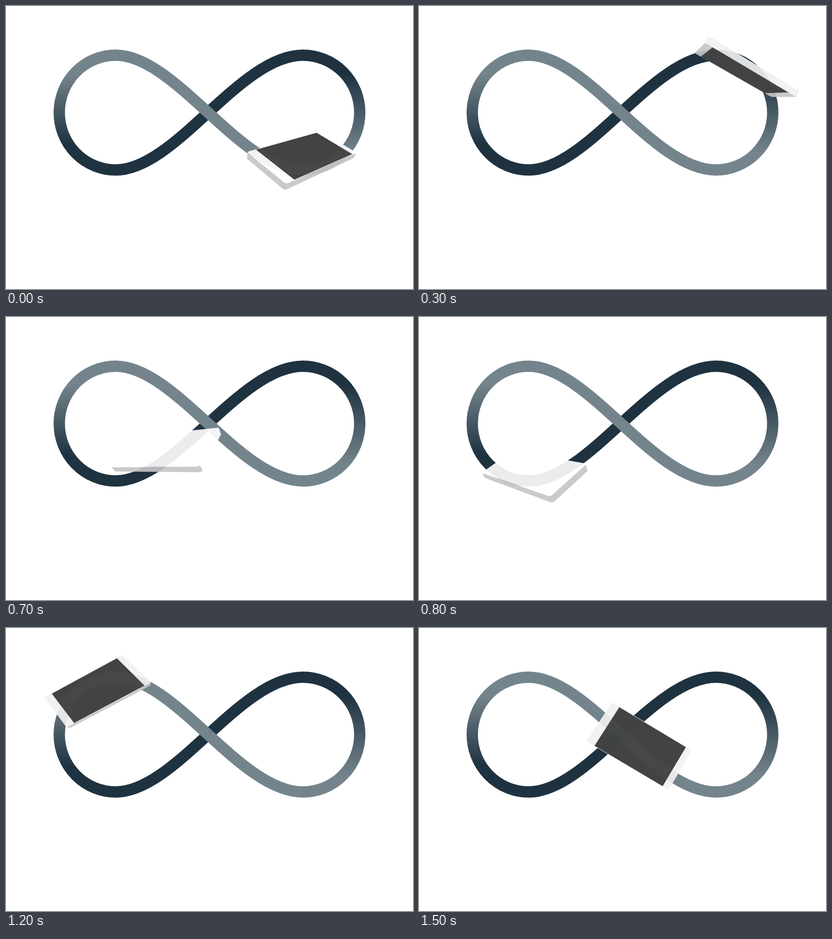
An HTML page with a canvas that plays this animation: 898x624 px, repeating every 1600 ms.

```html
<!DOCTYPE html>
<html lang="en">
<head>
<meta charset="utf-8">
<title>Phone on an infinity loop</title>
<style>
html, body { margin: 0; width: 100%; height: 100%; overflow: hidden; background: #fff; }
canvas { display: block; }
</style>
</head>
<body>
<canvas width="898" height="624"></canvas>
<script>
const g = document.querySelector('canvas').getContext('2d');
const LOOP = 1600, STEP = 100, CAMERA = 520, THICKNESS = 15;
const GREY = '#74848d', DARK = '#1f3240';

// Time, then the four front corners of the phone as seen on the stage.
const poses = [
  [0, 533,322, 694,277, 772,323, 618,391],
  [300, 777,200, 609,104, 632,82, 831,200],
  [500, 655,100, 471,124, 487,195, 699,158],
  [800, 372,338, 212,306, 145,354, 295,409],
  [1000, 177,324, 127,143, 77,141, 133,346],
  [1100, 62,230, 141,67, 187,96, 96,285],
  [1200, 86,153, 257,60, 319,120, 134,218],
  [1500, 426,165, 601,270, 550,356, 371,250]
].map(solvePose);

const cross = (a, b) => [a[1] * b[2] - a[2] * b[1], a[2] * b[0] - a[0] * b[2], a[0] * b[1] - a[1] * b[0]];
const scaleTo = (v, length) => v.map(c => c * length / Math.hypot(...v));
const minus = (a, b) => a.map((c, i) => c - b[i]);

// Recover centre and 3D edge vectors from where the diagonals cross.
function solvePose([time, ax, ay, bx, by, cx, cy, dx, dy]) {
  const px = cx - ax, py = cy - ay, qx = dx - bx, qy = dy - by;
  const s = ((bx - ax) * qy - (by - ay) * qx) / (px * qy - py * qx);
  const r = ((bx - ax) * py - (by - ay) * px) / (px * qy - py * qx);
  const half = (x, y, k) => [2 * k * (1 - k) * x, 2 * k * (1 - k) * y, (1 - 2 * k) * CAMERA];
  const c = half(px, py, s), d = half(qx, qy, r);
  return { time, state: [ax + s * px, ay + s * py, ...c.map((v, i) => v - d[i]), ...c.map((v, i) => v + d[i])] };
}

function key(i) {
  const n = poses.length, turn = Math.floor(i / n), pose = poses[i - turn * n];
  return { time: pose.time + turn * LOOP, state: pose.state };
}

function poseAt(time) {
  let i = poses.length - 1;
  while (poses[i].time > time) i--;
  const [k0, k1, k2, k3] = [i - 1, i, i + 1, i + 2].map(key);
  const h0 = k1.time - k0.time, h = k2.time - k1.time, h2 = k3.time - k2.time;
  const t = (time - k1.time) / h;
  const state = k1.state.map((a, j) => {
    const b = k2.state[j], slope = (b - a) / h;
    const m1 = (h * (a - k0.state[j]) / h0 + h0 * slope) / (h0 + h);
    const m2 = (h2 * slope + h * (k3.state[j] - b) / h2) / (h + h2);
    return a + (b - a) * t * t * (3 - 2 * t) + h * t * (1 - t) * (m1 * (1 - t) - m2 * t);
  });
  const edge = from => {
    const size = k => Math.hypot(...k.state.slice(from, from + 3));
    return scaleTo(state.slice(from, from + 3), size(k1) + (size(k2) - size(k1)) * t);
  };
  return { x: state[0], y: state[1], u: edge(2), v: edge(5) };
}

function verticalFade(top, bottom, y1, y2) {
  const fade = g.createLinearGradient(0, y1, 0, y2);
  fade.addColorStop(0, top);
  fade.addColorStop(1, bottom);
  return fade;
}

const track = [
  ['M242 361.5C374 361.5 516 108.5 655 108.5', DARK],
  ['M241 361.5H242A124.5 126.5 0 0 1 242 108.5H243', verticalFade(GREY, DARK, 150, 305)],
  ['M654 108.5H655A125.5 126.5 0 0 1 655 361.5H654', verticalFade(DARK, GREY, 150, 325)],
  ['M242 108.5C374 108.5 516 361.5 655 361.5', GREY]
].map(([d, colour]) => [new Path2D(d), colour]);

function drawTrack() {
  g.lineWidth = 25;
  for (const [path, colour] of track) {
    g.strokeStyle = colour;
    g.stroke(path);
  }
}

// Rounded outline of the phone in units of its two edges.
const outline = [];
[[-1, -1], [1, -1], [1, 1], [-1, 1]].forEach(([a, b], corner) => {
  for (let i = 0; i <= 4; i++) {
    const angle = (corner + 2 + i / 4) * Math.PI / 2;
    outline.push([a * 0.485 + 0.02 * Math.cos(angle), b * 0.47 + 0.04 * Math.sin(angle)]);
  }
});
const screen = [[-0.41, -0.5], [0.43, -0.5], [0.43, 0.5], [-0.41, 0.5]];

function shade([nx, ny, nz]) {
  if (nz < 0.9 && 0.1 * nx - ny < 0) return 197;
  return nz - 0.2 * Math.abs(nx) > 0.55 ? 241 : 255;
}

function drawPhone({ x, y, u, v }) {
  const back = scaleTo(cross(v, u), THICKNESS);
  const place = ([a, b]) => u.map((c, i) => c * a + v[i] * b);
  const project = ([px, py, pz]) => {
    const s = CAMERA / (CAMERA - pz);
    return [x + px * s, y + py * s];
  };
  const facing = points => points.reduce((sum, p, i) => {
    const q = points[(i + 1) % points.length];
    return sum + p[0] * q[1] - p[1] * q[0];
  }, 0) > 0;
  const paths = new Map();

  const addFace = (points, normal) => {
    const flat = points.map(project);
    if (!facing(flat)) return;
    const tone = shade(scaleTo(normal, 1));
    if (!paths.has(tone)) paths.set(tone, new Path2D());
    const path = paths.get(tone);
    flat.forEach(([px, py], i) => i ? path.lineTo(px, py) : path.moveTo(px, py));
    path.closePath();
  };

  const front = outline.map(place);
  const rear = front.map(p => p.map((c, i) => c + back[i]));
  front.forEach((p, i) => {
    const j = (i + 1) % front.length;
    addFace([front[j], p, rear[i], rear[j]], cross(minus(p, front[j]), back));
  });
  addFace(front, back.map(c => -c));
  addFace([...rear].reverse(), back);
  for (const [tone, path] of paths) {
    g.fillStyle = `rgba(${tone},${tone},${tone},.91)`;
    g.fill(path);
  }

  const glass = screen.map(place).map(project);
  if (!facing(glass)) return;
  g.save();
  g.beginPath();
  glass.forEach(p => g.lineTo(...p));
  g.closePath();
  g.fillStyle = '#434343';
  g.fill();
  g.clip();
  g.globalAlpha = 0.06;
  drawTrack();
  g.restore();
}

function frame() {
  const time = Math.floor(performance.now() % LOOP / STEP) * STEP;
  g.fillStyle = '#fff';
  g.fillRect(0, 0, 898, 624);
  drawTrack();
  drawPhone(poseAt(time));
  requestAnimationFrame(frame);
}
frame();
</script>
</body>
</html>
```
